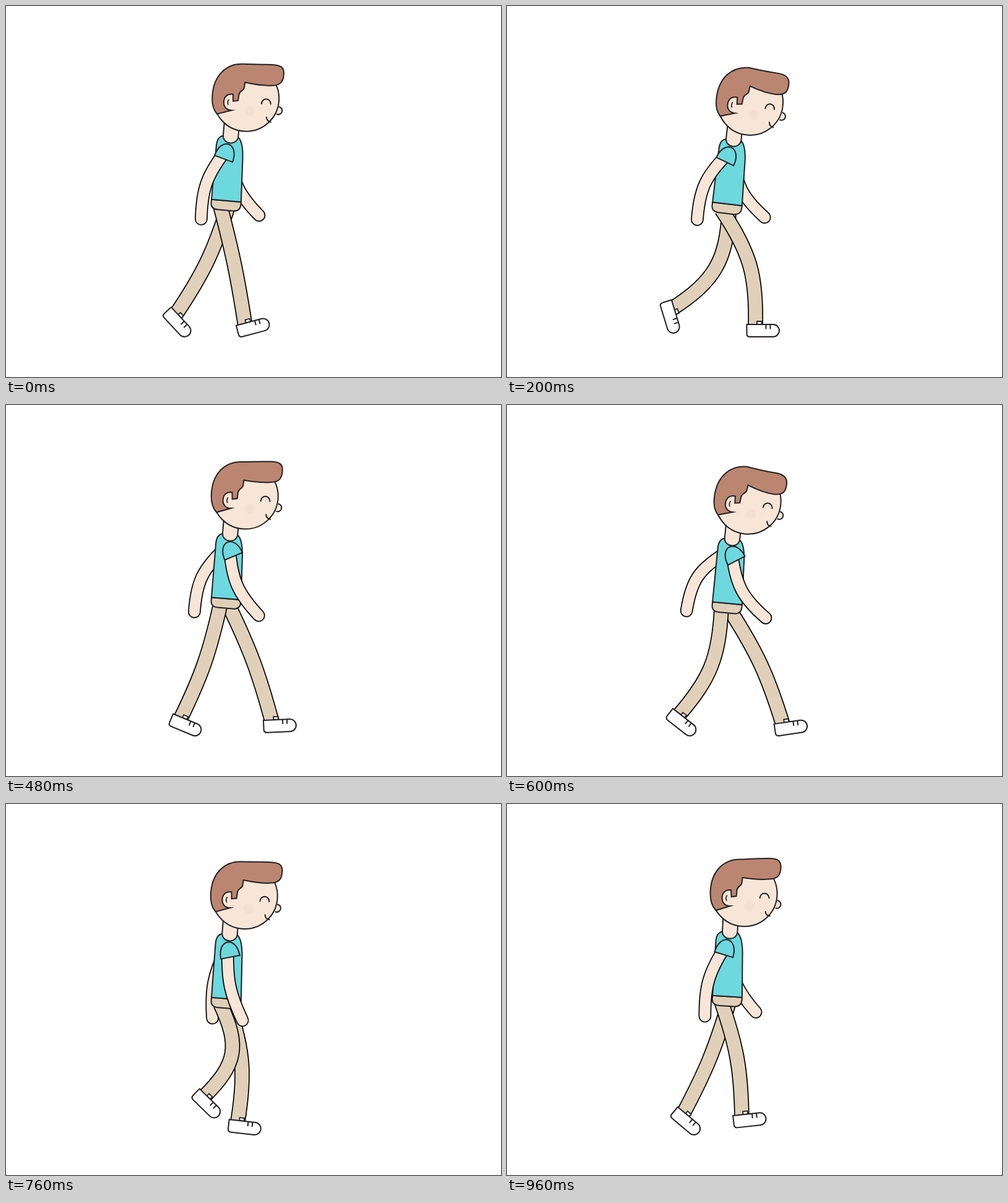
These frames come from a looping animation (800x600 px, 1000 ms). An HTML page with a canvas:

```html
<!DOCTYPE html>
<html lang="en">
<head>
<meta charset="utf-8">
<title>Walk cycle</title>
<style>
html, body { margin: 0; width: 100%; height: 100%; overflow: hidden; background: #fff; }
canvas { display: block; width: 800px; height: 600px; }
</style>
</head>
<body>
<canvas id="stage" width="800" height="600"></canvas>
<script>
const ctx = document.getElementById('stage').getContext('2d');
const LOOP = 1000, STEP = 40, GROUND = 535;
const INK = '#231f20', SKIN = '#f7e6d7', SHIRT = '#6ed8df', PANTS = '#e0d0b9',
      HAIR = '#bb8671', CHEEK = '#f3dfd3', WHITE = '#fff';

// Key points are [time, value...]; the rest of the motion follows from them.
const BOB = [[0, .24], [180, 1], [350, -.8], [395, -1], [470, -.1]];
const KNEE = [[0, 3], [200, 19], [370, 3], [480, 7], [680, 27], [820, 32], [960, 9]];

// stride: ankle x and foot turn; lift: height, start and end of the swing
const NEAR = {
  hip: 346.5, phase: 0, lift: [33, 650, 1000],
  stride: [[0, 385.5, -15], [100, 400, -11], [200, 401.5, 0], [360, 326, 11],
           [480, 283, 22.5], [680, 293.5, 44.5], [840, 354.3, 36]],
  reach: 127,
  swing: [[0, 20.3], [200, 25.5], [360, -8.3], [480, -23], [680, -23], [840, 3]]
};
const FAR = {
  hip: 359, phase: 500, lift: [12, 130, 540],
  stride: [[0, 276.5, 47], [100, 251, 60], [200, 270, 73], [360, 365.5, 58],
           [480, 430, -2.5], [560, 448, -9], [680, 422, -1.5], [840, 324.5, 17]],
  reach: 123.5,
  swing: [[0, -23.6], [200, -26], [360, 9.6], [480, 26.1], [680, 30.7], [840, -9.4]]
};

// smooth periodic curve through key points
function curve(keys, t, period = LOOP) {
  t %= period;
  const n = keys.length;
  const row = i => keys[(i + n) % n];
  const time = i => row(i)[0] + period * Math.floor(i / n);
  let i = n - 1;
  while (keys[i][0] > t) i--;
  const t0 = time(i - 1), t1 = time(i), t2 = time(i + 1), t3 = time(i + 2);
  const h = t2 - t1, u = (t - t1) / h, u2 = u * u, u3 = u2 * u;
  const slope = (a, b, c, ha, hb) => ((b - a) / ha * hb + (c - b) / hb * ha) / (ha + hb);
  return row(i).slice(1).map((b, k) => {
    const a = row(i - 1)[k + 1], c = row(i + 1)[k + 1], d = row(i + 2)[k + 1];
    const m1 = slope(a, b, c, t1 - t0, h) * h;
    const m2 = slope(b, c, d, h, t3 - t2) * h;
    return (2 * u3 - 3 * u2 + 1) * b + (u3 - 2 * u2 + u) * m1
         + (3 * u2 - 2 * u3) * c + (u3 - u2) * m2;
  });
}

const rad = deg => deg * Math.PI / 180;

// point given in a frame placed at x, y and turned by deg
function place([x, y], deg, px, py) {
  const c = Math.cos(rad(deg)), s = Math.sin(rad(deg));
  return [x + px * c - py * s, y + px * s + py * c];
}

function within([x, y], deg, draw) {
  ctx.save();
  ctx.translate(x, y);
  ctx.rotate(rad(deg));
  draw();
  ctx.restore();
}

function shape(d, fill, line = 2) {
  const p = new Path2D(d);
  if (fill) {
    ctx.fillStyle = fill;
    ctx.fill(p);
  }
  if (line) {
    ctx.strokeStyle = INK;
    ctx.lineWidth = line;
    ctx.stroke(p);
  }
}

// bendy tube whose middle bulges sideways by the given amount
function hose([x1, y1], [x2, y2], bulge, width, color, cap) {
  const dx = x2 - x1, dy = y2 - y1, len = Math.hypot(dx, dy), pull = .8;
  const off = bulge / (.75 * pull) / len;
  const cx = (x1 + x2) / 2 + off * dy, cy = (y1 + y2) / 2 - off * dx;
  const mix = (a, b) => a + (b - a) * pull;
  ctx.lineCap = cap;
  for (const [w, c] of [[width + 1.7, '#000'], [width - 1.7, color]]) {
    ctx.beginPath();
    ctx.moveTo(x1, y1);
    ctx.bezierCurveTo(mix(x1, cx), mix(y1, cy), mix(x2, cx), mix(y2, cy), x2, y2);
    ctx.lineWidth = w;
    ctx.strokeStyle = c;
    ctx.stroke();
  }
  ctx.lineCap = 'butt';
}

// the lower of heel and toe rests on the ground, except during the swing
function ankleY(turn, [height, from, to], t) {
  const c = Math.cos(rad(turn)), s = Math.sin(rad(turn));
  const sole = Math.max(28.5 * s + 10 * c + 10, -9 * s + 15 * c + 5);
  const u = (t - from) / (to - from);
  const lift = u > 0 && u < 1 ? height * Math.sin(Math.PI * u) : 0;
  return GROUND - sole - lift;
}

function leg(side, t, hipY) {
  const [x, turn] = curve(side.stride, t);
  const ankle = [x, ankleY(turn, side.lift, t)];
  const [knee] = curve(KNEE, t + side.phase);
  hose([side.hip, hipY], place(ankle, turn, 0, 4), knee, 23, PANTS, 'butt');
  within(ankle, turn, () => {
    shape('M2.5,0V-5H10V0Z', WHITE, 1.8);
    shape('M-14,0H28.5A10,10 0 0 1 28.5,20H-9Q-14,20 -14,15Z', WHITE);
    shape('M17,0V7.5M24,0V7.5', null);
  });
}

// the arm swings stiffly from the shoulder and bows more the further it goes
function arm(side, t, shoulder) {
  const [turn] = curve(side.swing, t);
  hose(place(shoulder, turn, -2, 12), place(shoulder, turn, 0, side.reach),
       -5 - .3 * Math.abs(turn), 19, SKIN, 'round');
  if (side === NEAR) {
    within(shoulder, turn, () => shape('M-15.5,23C-15.5,-10 15.5,-10 15.5,23Z', SHIRT));
  }
}

function torso(waist, lean) {
  within(waist, lean, () => {
    shape('M-24,0V5Q-24,15.5 -12,15.5H12Q24,15.5 24,4V0Z', PANTS);
    shape('M-24,0V-87Q-24,-102 -14.5,-104H10Q20,-96 20.7,-62L24,0Z', SHIRT);
    shape('M-14.5,-130V-105.5C-14.5,-89.5 10,-89.5 10,-105.5V-130', SKIN);
  });
}

// d: how far the quiff droops
function head(center, turn, d) {
  within(center, turn, () => {
    shape('M-53,0A53,53 0 1 1 53,0A53,53 0 1 1 -53,0Z', SKIN);
    shape('M53,11A6.3,6.3 0 1 1 50,23', SKIN);
    shape('M-1,20a8,8 0 1 1 16,0a8,8 0 1 1 -16,0Z', CHEEK, 0);
    shape('M25,8C25,-3.5 40,-3.5 40,8', null);
    shape('M34,28C34,33 37,36 42,36.5', null);
    shape(`M-46,27C-53,20 -55,10 -55,0C-55,-36 -34,-55 -8,-55.5
      C8,${-56 + .3 * d} 20,${-57 + .6 * d} 40,${-57 + .7 * d}
      C53,${-57 + .8 * d} 59,${-54 + d} 59,${-44 + d}
      C59,${-30 + d} 54,${-24 + .8 * d} 40,${-23.5 + .8 * d}
      C25,${-22 + .6 * d} 10,${-24 + .3 * d} -3,-26
      L-4,-18C-4,-12 -11,-13 -12,-6L-13,4L-21,5L-21.5,-6
      C-32,-7 -36,0 -36,7C-36,15 -31,20 -23,20Z`, HAIR);
    shape('M-28,2.5Q-31,7 -28.5,11.5', null, 1.7);
  });
}

function draw(t) {
  const [bob] = curve(BOB, t, LOOP / 2);
  const lean = 4.5 + 3 * bob - 1.4 * bob * bob + .8 * Math.sin(2 * Math.PI * t / LOOP);
  const waist = [356, 313 + 8 * bob];
  const hipY = waist[1] + 9;
  const shoulder = place(waist, lean, -4.5, -89.5);

  ctx.fillStyle = WHITE;
  ctx.fillRect(0, 0, 800, 600);
  arm(FAR, t, shoulder);
  leg(FAR, t, hipY);
  leg(NEAR, t, hipY);
  torso(waist, lean);
  head(place(waist, lean, 17.3, -167.5), 1.2 + 5.2 * bob, 8 * bob * bob + 2 * bob);
  arm(NEAR, t, shoulder);
}

function tick() {
  draw(Math.floor(performance.now() % LOOP / STEP) * STEP);
  requestAnimationFrame(tick);
}
tick();
</script>
</body>
</html>
```
